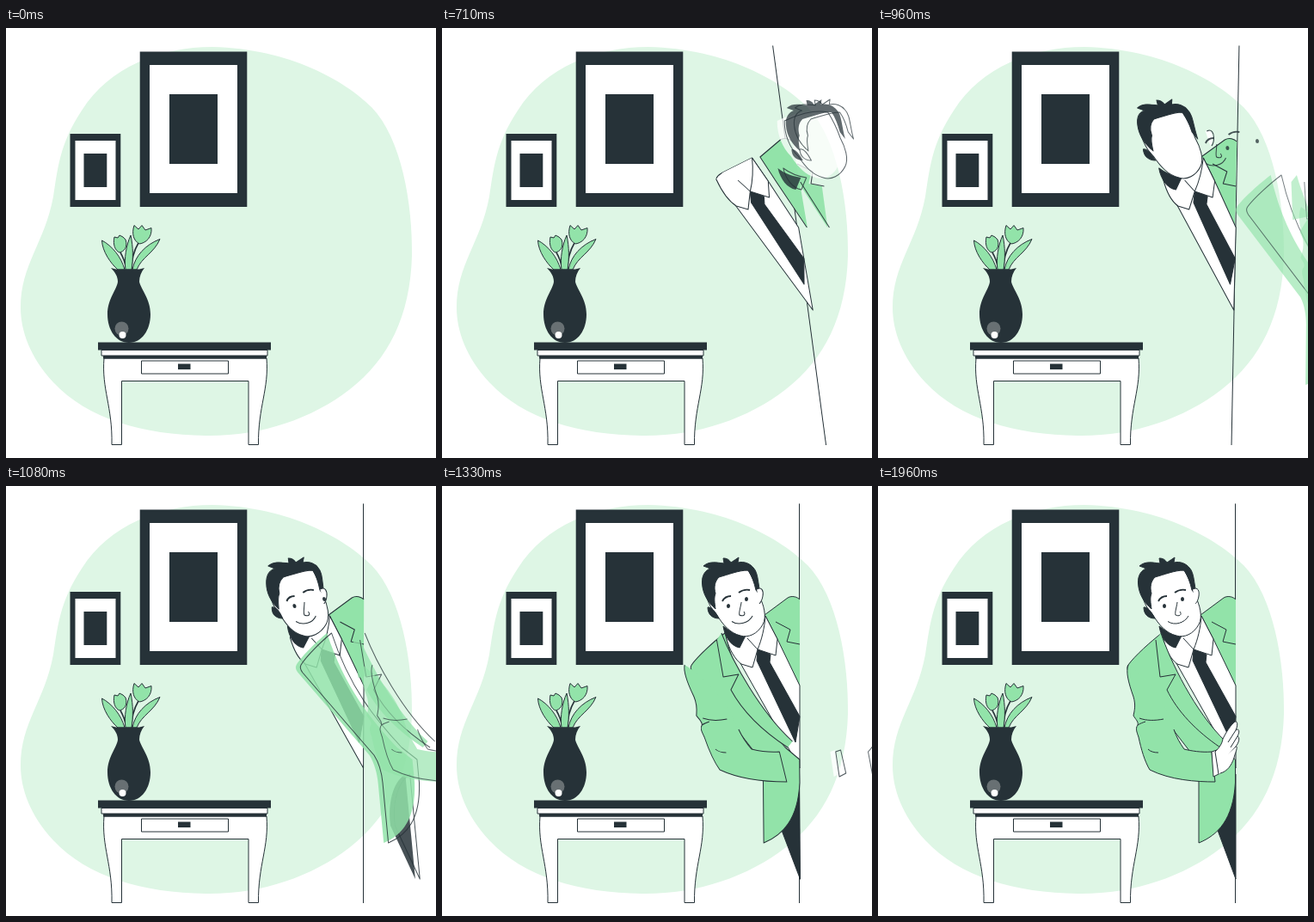
An HTML page with a canvas for the animation above (2 s loop, 500 px wide and 500 px high).

```html
<!DOCTYPE html>
<html lang="en">
<head>
<meta charset="utf-8">
<title>Peeking around the wall</title>
<style>
html, body { margin: 0; width: 100%; height: 100%; overflow: hidden; background: #fff; }
canvas { display: block; width: 500px; height: 500px; }
</style>
</head>
<body>
<canvas id="stage" width="500" height="500"></canvas>
<script>
const ctx = document.getElementById('stage').getContext('2d');
const LOOP = 2000, ENTER = 500;
const DARK = '#263238', GREEN = '#92e3a9', PALE = '#def6e5', WHITE = '#fff';

function fill(path, color) {
  ctx.fillStyle = color;
  ctx.fill(new Path2D(path));
}

function stroke(path, width = 1) {
  ctx.strokeStyle = DARK;
  ctx.lineWidth = width;
  ctx.stroke(new Path2D(path));
}

function shape(path, color, width = 1) {
  fill(path, color);
  stroke(path, width);
}

function box(x1, y1, x2, y2, color) {
  ctx.fillStyle = color;
  ctx.fillRect(x1, y1, x2 - x1, y2 - y1);
}

function dot(x, y, r, color) {
  ctx.fillStyle = color;
  ctx.beginPath();
  ctx.arc(x, y, r, 0, Math.PI * 2);
  ctx.fill();
}

function drawRoom() {
  fill('M240 22C330 24 395 62 425 92C460 128 473 205 472 265C470 335 445 385 400 420C355 455 295 475 232 474C160 473 95 455 55 412C28 383 17 352 17 325C17 275 45 250 55 196C60 165 62 135 88 96C120 45 180 22 240 22Z', PALE);

  box(155.7, 27.5, 280.3, 208, DARK);
  box(167, 43, 269, 192, WHITE);
  box(190, 77, 246, 158, DARK);
  box(74.5, 123, 133.3, 208, DARK);
  box(80.5, 131, 127.5, 200, WHITE);
  box(90.5, 146, 117.3, 185, DARK);

  stroke('M133 261C137 268 139 274 140 281M154 250C148 260 146 270 146 281', 1.6);
  shape('M111.5 247C112 260 122 274 130 281H138C134 266 123 253 111.5 247Z', GREEN);
  shape('M179 245.5C162 252 150 265 147 281H152C158 266 172 262 179 245.5Z', GREEN);
  shape('M145 241C140 252 137 268 139 281H146C148 268 148 255 145 241Z', GREEN);
  shape('M126 243L130 244L132 241L136 243L139 246C142 255 137 260 132 261C127 259 124 252 126 243Z', GREEN);
  shape('M149 229.5L154 234L158 229.5L162 235L169 232.5C170 243 163 250 155 251C148 247 146 239 149 229.5Z', GREEN);
  fill('M122 279L128 280.5H155L161 279C157 284 155 289 155 295C157 304 168 315 168 333C168 351 158 366 143 366C128 366 118 351 118 333C118 315 129 304 130 295C130 289 127 284 122 279Z', DARK);
  dot(134.5, 349.5, 8, '#687073');
  dot(135.5, 357, 4, WHITE);

  shape('M114 384C111 420 124 440 123 484.5H134.5V410.5H282V484.5H293.5C293 440 306 420 303 384Z', WHITE);
  shape('M111 374.5H304V381H111Z', WHITE);
  box(107, 365.5, 308, 374.5, DARK);
  box(113, 381, 303, 384.5, DARK);
  shape('M157.5 387H258.5V402H157.5Z', WHITE);
  box(200, 390.5, 214.5, 397, DARK);
}

// land: when the slide reaches its place; mid: height the skew turns about
const parts = [
  { land: 671, mid: 252, rate: 0.82, line: 'M415.5 20.5V485' },

  { land: 706, mid: 180, color: GREEN,
    path: 'M375 150L402 130C407 127 413 129 416 132V232L389 179Z',
    line: 'M416 132C413 129 407 127 402 130L375 150L389 179L415.5 232' },
  { land: 756, mid: 190, color: GREEN,
    path: 'M375 150L392 160L406 167L401 181L416 184V232L389 179Z',
    line: 'M388 158L405 167L401 181L416 184M389 179L415.5 232' },

  { land: 708, mid: 240, color: WHITE,
    path: 'M330 176C331 172 335 170 339 168L376 151L390 178L416 232V328Z' },
  { land: 708, mid: 240, color: DARK,
    path: 'M367 189L382 196L381 205L416 268L411 298L366 203Z' },
  { land: 708, mid: 240, color: WHITE,
    path: 'M330 176C334 190 341 202 348 207L361 211L367 190L388 197L390 178L376 151L339 168Z',
    line: 'M330 176C334 190 341 202 348 207L361 211L367 190L355 177M376 151L390 178L388 197L367 190C372 178 375 165 376 151' },
  { land: 820, mid: 176, color: DARK,
    path: 'M327 163C332 167 340 172 353 174L346 188C336 186 329 176 327 163Z' },

  { land: 856, mid: 130, color: WHITE,
    path: 'M305 108C317 102 340 94 356 98C362 108 366 118 369 128C374 138 378 152 373 161C367 172 356 177 347 174C335 171 327 162 319 149C310 140 304 124 305 108Z' },
  { land: 876, mid: 120, color: DARK,
    path: 'M371 129L365 121C363 112 360 104 356 98C345 98 333 103 322 106C317 111 316 118 318 125C316 130 317 136 318 143C309 135 303 125 302.5 113C302 104 306 98 312 96L304 93C311 87 319 89 328 90L327 84C332 84 334 86 336 89L345 83L344 89C352 87 359 91 362 95C368 101 367 113 371 129Z' },
  { land: 876, mid: 148, color: DARK,
    path: 'M309 141C313 140 318 146 322 154C314 154 309 149 309 141Z' },

  { land: 988, mid: 128, color: WHITE,
    path: 'M366 120C372 117 374 122 373 128C372 134 370 136 369 137Z',
    line: 'M366 120C372 117 374 122 373 128C372 134 370 136 369 137' },
  { land: 1029, mid: 157, line: 'M337 157.5C345 163 357 159 361 151' },
  { land: 1033, mid: 143, line: 'M348 135C347 142 345 147 346 150C350 152 354 150 351 146' },
  { land: 1045, mid: 131, line: 'M326 134C328 130 332 128 336 128', width: 1.8 },
  { land: 1057, mid: 122, line: 'M345 124C349 121 353 120 358 121', width: 1.8 },
  { land: 1085, mid: 139, color: DARK, plain: true,
    path: 'M331 139.5A2 2.5 0 1 1 335 139.5A2 2.5 0 1 1 331 139.5Z' },
  { land: 1108, mid: 131, color: DARK, plain: true,
    path: 'M352 131.5A2 2.5 0 1 1 356 131.5A2 2.5 0 1 1 352 131.5Z' },

  { land: 1172, mid: 393, color: DARK,
    path: 'M393 395C392 370 400 345 416 335V457Z' },
  { land: 1173, mid: 290, color: GREEN,
    path: 'M330 171C318 180 298 198 291 208C289 211 290 214 292 217L366 313C371 322 373 335 373 345V415C395 406 413 388 415.5 345V318L399 304C372 272 345 235 330 171Z' },
  { land: 1222, mid: 238, color: GREEN,
    path: 'M329 171C340 204 368 262 404 297L398 304C370 285 348 262 336 237L346 219L327 223L323 179Z',
    line: 'M329 171C340 204 368 262 404 297M323 179L328 222L346 219L336 237C348 262 370 285 398 304' },

  { land: 1288, mid: 276, color: GREEN,
    path: 'M291 208C288 216 291 228 297 245C300 255 298 262 297 267C300 272 303 274 302 278C299 282 301 286 303 292C306 306 310 320 316 330C340 342 370 344 392 344L388 309C376 310 364 308 356 306C350 296 345 288 342 278C335 250 312 222 291 208Z',
    line: 'M291 208C288 216 291 228 297 245C300 255 298 262 297 267C300 272 303 274 302 278C299 282 301 286 303 292C306 306 310 320 316 330C340 342 370 344 392 344L388 309C376 310 364 308 356 306C351 299 347 292 344 283M304 270C312 273 322 273 332 271M302 278C305 276 308 275 311 274M314 306C317 309 321 310 326 310' },

  { land: 1440, mid: 323, color: WHITE,
    path: 'M388 309L394 307L398 334L390 338Z' },
  { land: 1490, mid: 305, color: WHITE,
    path: 'M392 309C397 304 400 300 401 294C405 286 410 278 415 274C419 273 418 280 416 284C420 281 421 286 418 291C421 292 420 298 416 303C418 306 415 311 413 315C408 324 402 333 396 335Z',
    line: 'M396 335L392 309C397 304 400 300 401 294C405 286 410 278 415 274C419 273 418 280 416 284C420 281 421 286 418 291C421 292 420 298 416 303M416 284L407 298M418 291L410 304M416 303L408 312' },
  { land: 1550, mid: 319, color: WHITE,
    path: 'M417 303C418 306 415 311 414 316C411 325 406 332 398 334C402 327 404 318 408 311Z',
    line: 'M417 303C418 306 415 311 414 316C411 325 406 332 398 334' }
];

const SLIDE = 600, SETTLE = 200, SPEED = 0.65, FILL_RATE = 0.91;

// Slide in from the right while leaning, then swing back upright
function pose(t, land) {
  const left = land - t;
  if (left >= 0) {
    const r = left / SLIDE;
    return { shift: left * SPEED, lean: 10 - 30 * r, alpha: Math.max(0, 1 - r) };
  }
  const s = -left / SETTLE;
  const lean = s < 1 ? 10 - 12 * s : Math.min(0, -2 + 2 * (s - 1));
  return { shift: 0, lean, alpha: 1 };
}

function posed(t, part, rate, draw) {
  const { shift, lean, alpha } = pose(t, part.land);
  if (alpha <= 0) return;
  const k = Math.tan(lean * Math.PI / 180);
  ctx.save();
  ctx.globalAlpha = alpha;
  ctx.transform(1, 0, k, 1, shift * rate - k * part.mid, 0);
  draw();
  ctx.restore();
}

// Fills run slightly ahead of their outlines until both land
function drawPart(p, t) {
  if (p.path) posed(t, p, FILL_RATE, () => fill(p.path, p.color));
  if (!p.plain) posed(t, p, p.rate || 1, () => stroke(p.line || p.path, p.width));
}

function render(t) {
  ctx.clearRect(0, 0, 500, 500);
  ctx.lineJoin = 'round';
  drawRoom();
  if (t >= ENTER) parts.forEach(p => drawPart(p, t));
}

const start = performance.now();
function tick() {
  render((performance.now() - start) % LOOP);
  requestAnimationFrame(tick);
}
tick();
</script>
</body>
</html>
```
